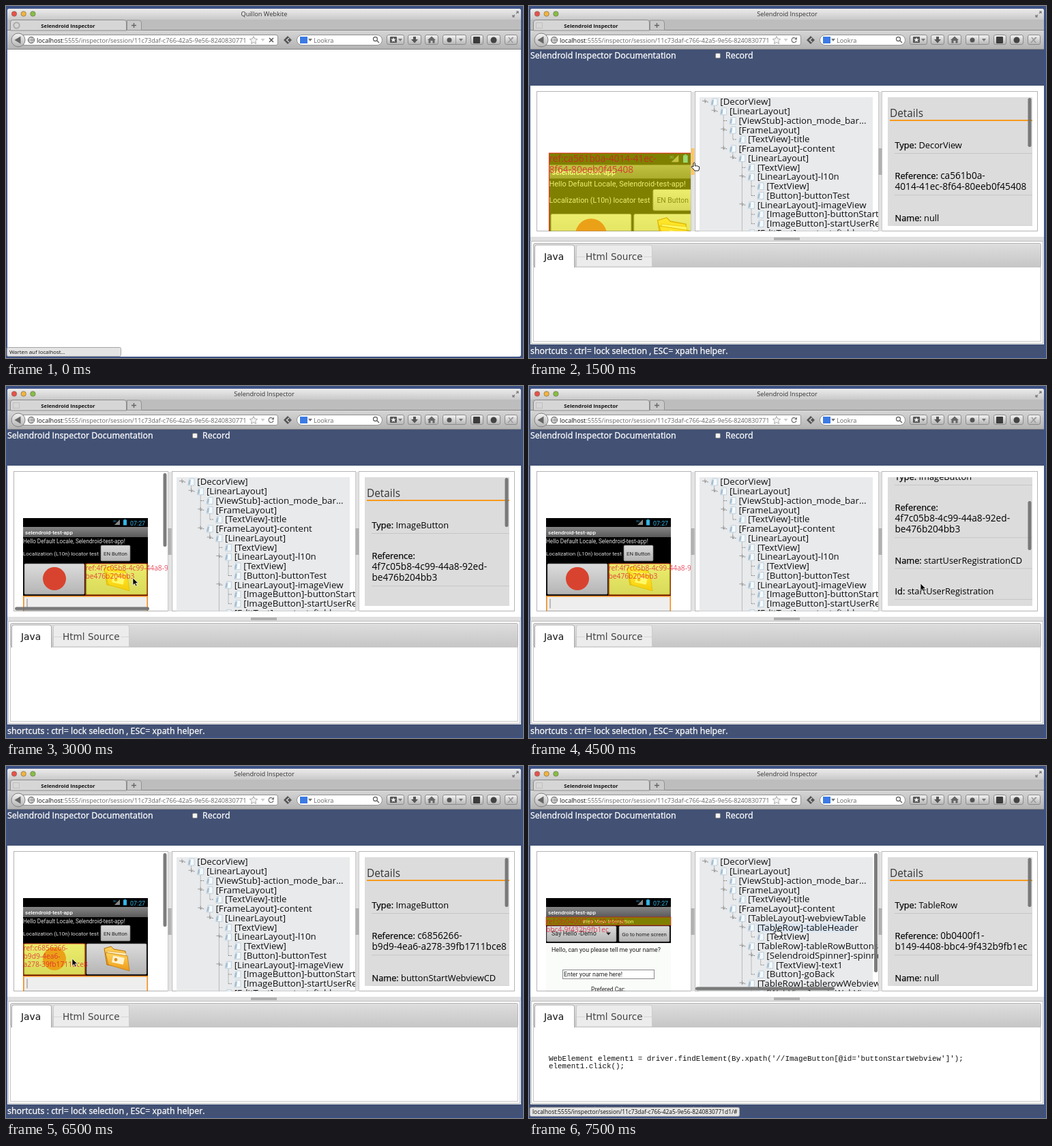
Write an HTML page that moves like this. It is 758 px wide and 517 px high and loops after 8000 ms.

```html
<!DOCTYPE html>
<html lang="en">
<head>
<meta charset="utf-8">
<title>Inspector demo</title>
<style>
html, body { margin: 0; width: 100%; height: 100%; overflow: hidden; background: #3c5184; }
svg { display: block; width: 758px; height: 517px; font-family: "Open Sans", "Noto Sans", sans-serif; }
text { white-space: pre; }
.phone { font-family: Roboto, sans-serif; }
.tabs { font-family: "DejaVu Sans", sans-serif; }
.code { font-family: "Liberation Mono", monospace; }
.bright { stroke: #fff; stroke-width: .3px; }
</style>
</head>
<body>
<svg id="stage" viewBox="0 0 758 517"></svg>
<script>
const STEP = 500, LOOP = 8000;
const stage = document.getElementById('stage');

const rect = (x, y, w, h, fill, more = '') => `<rect x="${x}" y="${y}" width="${w}" height="${h}" fill="${fill}" ${more}/>`;
const circle = (x, y, r, fill, more = '') => `<circle cx="${x}" cy="${y}" r="${r}" fill="${fill}" ${more}/>`;
const path = (d, fill, more = '') => `<path d="${d}" fill="${fill}" ${more}/>`;
const line = (d, stroke, width = 1, more = '') => path(d, 'none', `stroke="${stroke}" stroke-width="${width}" ${more}`);
const text = (x, y, s, size, fill = '#111', more = '') => `<text x="${x}" y="${y}" font-size="${size}" fill="${fill}" ${more}>${s}</text>`;
const group = (body, more = '') => `<g ${more}>${body}</g>`;
const clip = (id, x, y, w, h) => `<clipPath id="${id}">${rect(x, y, w, h, '#000')}</clipPath>`;
const gradient = (id, ...colors) => `<linearGradient id="${id}" x2="0" y2="1">${colors.map((c, i) =>
  `<stop offset="${i / (colors.length - 1)}" stop-color="${c}"/>`).join('')}</linearGradient>`;
const middle = 'text-anchor="middle"';

const defs = gradient('title', '#ececec', '#c9c9c9') + gradient('bar', '#d6d6d6', '#b2b2b2') +
  gradient('knob', '#f4f4f4', '#b4b4b4') + gradient('strip', '#dedede', '#c6c6c6') +
  gradient('appbar', '#858585', '#5a5a5a') + gradient('key', '#dcdcdc', '#b4b4b4') +
  gradient('folder', '#ffd45c', '#ee9a16');

// Browser window

const arrowDown = (x, y, fill = '#777') => path(`M${x - 3} ${y - 2}h6l-3 4z`, fill);

function toolButton(x, w, icon) {
  return rect(x + .5, 42.5, w, 14, 'url(#knob)', 'rx="2.5" stroke="#8c8c8c"') + icon;
}

function browser(loading) {
  const lights = ['#e9514b', '#f2b43c', '#83c043'].map((c, i) =>
    circle(12 + i * 13.7, 11.5, 3.7, c, 'stroke="#7c6a5a" stroke-width=".7"')).join('');
  const tools = [
    toolButton(558, 25, rect(563, 45, 10, 9, '#555', 'rx="1"') +
      path('M568 46l1.1 2.4 2.6.2-2 1.7.7 2.5-2.4-1.4-2.3 1.4.6-2.5-2-1.7 2.7-.2z', '#eee') + arrowDown(578, 50)),
    toolButton(589, 19, path('M597 45h4v4h3l-5 5.5-5-5.5h3z', '#555')),
    toolButton(614, 19, path('M624 44.5l6 5.5h-1.5v4.5h-3V51h-3v3.5h-3V50H618z', '#666')),
    toolButton(640, 34, circle(650, 50, 3.5, '#555') + line('M659.5 43v13', '#999') + arrowDown(667, 50)),
    toolButton(681, 18, rect(685, 45, 10, 10, '#3c3c3c', 'rx="1"')),
    toolButton(705, 19, circle(715, 50, 4.5, '#444')),
    toolButton(731, 18, line('M736 54l7-8M737 46l6 8M739 51l5-5', '#999', 1.3))
  ].join('');
  const name = loading ? 'Quillon Webkite' : 'Selendroid Inspector';
  return rect(0, 0, 758, 517, '#3c5184') +
    rect(2, 4, 753, 511, '#fff', 'rx="3"') +
    path('M2 20V8q0-4 4-4h745q4 0 4 4v12z', 'url(#title)') +
    rect(2, 20, 753, 16, '#bdbdbd') + rect(2, 36, 753, 28, 'url(#bar)') +
    line('M2 35.5h753M2 63.5h753', '#858585') +
    lights + text(378.5, 15, name, 9.2, '#333', middle) +
    line('M743 16l3-3m-3 0v3h3M751 8l-3 3m3 0v-3h-3', '#777', 1.2) +
    path('M6.5 36V24q0-3.5 3.5-3.5h163q3.5 0 3.5 3.5v12z', '#d6d6d6', 'stroke="#8b8b8b"') +
    path('M177.5 35.5V21h17q4 0 4 4v10.5z', '#c9c9c9', 'stroke="#929292"') +
    line('M184 28.5h7M187.5 25v7', '#666', 1.4) +
    (loading ? circle(15.5, 28.5, 4.2, 'none', 'stroke="#aaa" stroke-width="2"')
      : rect(10.5, 24.5, 9, 8, 'none', 'stroke="#aaa" stroke-dasharray="1 1"')) +
    text(91, 32, 'Selendroid Inspector', 7.7, '#111', middle + ' font-weight="700"') +
    rect(22.5, 42.5, 376, 15, '#fff', 'rx="2.5" stroke="#929292"') +
    circle(18, 50, 10, 'url(#knob)', 'stroke="#818181"') + path('M12.5 50l9-5.5v11z', '#666') +
    circle(37, 50, 4.7, '#a5a5a5', 'stroke="#6d6d6d"') + line('M33 48h8M34 52h7M37 46q-4 4 0 8', '#eee', .8) +
    text(45, 53.5, 'localhost<tspan fill="#666">:5555/inspector/session/11c73daf-c766-42a5-9e56-8240830771</tspan>', 9.15) +
    path('M363 44.5l1.7 3.6 4 .5-2.9 2.8.7 4-3.5-1.9-3.5 1.9.7-4-2.9-2.8 4-.5z', '#f4f4f4', 'stroke="#aaa"') +
    arrowDown(376.5, 50, '#ccc') +
    (loading ? line('M386 47l6 6m0-6l-6 6', '#555', 1.5)
      : line('M391.5 48a3.5 3.5 0 1 0 .5 3', '#777', 1.3) + path('M393 45.5v4h-4z', '#777')) +
    path('M413 44l6 6-6 6-6-6z', '#555') + line('M415 47l-3.5 3 3.5 3', '#ddd', 1.2) +
    rect(426.5, 42.5, 125, 15, '#fff', 'rx="7.5" stroke="#929292"') +
    rect(431, 45, 11, 10, '#3c7ae4') + arrowDown(446, 50) + text(451, 53.5, 'Lookra', 9.2, '#666') +
    circle(541.5, 48.5, 3, 'none', 'stroke="#666" stroke-width="1.3"') + line('M544 51l3 3', '#666', 1.6) + tools;
}

function statusBubble(message, width, size) {
  return rect(1.5, 501.5, width, 13, '#e4e4e4', 'rx="2" stroke="#a5a5a5"') + text(5, 511, message, size);
}

// Phone screen, 183 units wide

function button(x, y, w, h, label = '', size = 7.8) {
  return rect(x, y, w, h, 'url(#key)', 'rx="1.5" stroke="#777" stroke-width=".7"') +
    (label && text(x + w / 2, y + h / 2 + 3, label, size, '#222', middle));
}

const statusBar = rect(0, 0, 183, 330, '#000') +
  text(157, 10.5, '07:27', 8.9, '#33b5e5') +
  path('M134 10l8-8v8z', '#888') + text(132, 6, '3G', 4, '#33b5e5') +
  rect(147, 2.5, 5, 8, '#33b5e5') + rect(148.5, 1.5, 2, 1, '#33b5e5') +
  rect(0, 13, 183, 15, 'url(#appbar)') +
  text(3, 24, 'selendroid-test-app', 8, '#fff', 'font-weight="500"');

const folder = path('M119 74l10-3 4 4 17 3 2 25-29-5z', 'url(#folder)', 'stroke="#b56d08"') +
  path('M123 78l28 3v21l-26-6z', '#fff0c0', 'stroke="#d69b31" stroke-width=".6"') +
  path('M121 80l32 5 3 22-31-9z', 'url(#folder)', 'stroke="#c37b12" stroke-width=".8"') +
  rect(131, 86, 17, 10, '#fff3cf', 'transform="rotate(12 139 91)"') + circle(136, 90.5, 2.4, '#d9902c');

const screens = {
  home: text(0, 37, 'Hello Default Locale, Selendroid-test-app!', 8.2, '#ddd') +
    text(0, 54.5, 'Localization (L10n) locator test', 8, '#ddd') +
    button(114, 40, 43, 23, 'EN Button') +
    button(2, 67, 88, 45) + button(93, 67, 88, 45) +
    circle(46, 89, 17, '#d8432f') + folder +
    rect(.8, 114.8, 181.5, 30, '#eee', 'stroke="#f48b1c" stroke-width="1.6"') +
    line('M6 118.5v14', '#888'),
  web: rect(0, 66, 183, 200, '#fafcf9') +
    text(91, 37, 'Web View Interaction', 8, '#eee', middle) +
    button(1, 41, 102, 23) + text(8, 55, 'Say Hello -Demo', 9, '#222') + path('M88 50.5h7l-3.5 4z', '#222') +
    button(107, 41, 74, 23, 'Go to home screen', 7.8) +
    text(88, 79, 'Hello, can you please tell me your name?', 8.9, '#222', middle) +
    rect(24.5, 105.5, 134, 13, '#fff', 'stroke="#888"') + text(26, 115, 'Enter your name here!', 8.9, '#222') +
    text(91, 137, 'Prefered Car:', 8.6, '#222', middle)
};

const marks = {
  root: [0, 0, 183, 330, 'ref:ca561b0a-4014-41ec-', '8f64-80eeb0f45408'],
  folder: [91.5, 67, 91, 46, 'ref:4f7c05b8-4c99-44a8-92ed-', 'be476b204bb3'],
  disc: [.5, 67, 91, 46, 'ref:c6856266-', 'b9d9-4ea6-', 'a278-39fb1711bce8'],
  row: [0, 28, 183, 12, 'ref:0b0400f1-b149-4408-', 'bbc4-9f432b9fb1ec']
};

function highlight(name) {
  if (!name) return '';
  const [x, y, w, h, ...lines] = marks[name];
  return rect(x, y, w, h, '#ff0', 'fill-opacity=".5" stroke="#f00" stroke-opacity=".55"') +
    lines.map((s, i) => text(x, y + 10 + i * 12, s, 10.26, '#e0142e', 'fill-opacity=".75"')).join('');
}

function phone({ large, screen, mark, split }) {
  const place = large ? 'translate(29.5 216) scale(1.337)' : 'translate(25 194)';
  return clip('phonePane', 12, 127, split - 12, 203.5) +
    group(group(group(statusBar + screens[screen], 'class="phone"') + highlight(mark), `transform="${place}"`),
      'clip-path="url(#phonePane)"');
}

// Element tree, each row led by its depth

const shared = ['0[DecorView]', '1[LinearLayout]', '2[ViewStub]-action_mode_bar...', '2[FrameLayout]',
  '3[TextView]-title', '2[FrameLayout]-content'];
const trees = {
  home: [...shared, '3[LinearLayout]', '4[TextView]', '4[LinearLayout]-l10n', '5[TextView]', '5[Button]-buttonTest',
    '4[LinearLayout]-imageView', '5[ImageButton]-buttonStartWebview', '5[ImageButton]-startUserRegistration',
    '4[EditText]-my_text_field'],
  web: [...shared, '3[TableLayout]-webviewTable', '4[TableRow]-tableHeader', '5[TextView]', '4[TableRow]-tableRowButtons',
    '5[SelendroidSpinner]-spinner_webdriver', '6[TextView]-text1', '5[Button]-goBack', '4[TableRow]-tablerowWebview',
    '5[WebView]-mainWebView']
};

function tree({ screen, split, mark }) {
  const left = split + 13, rows = trees[screen], depth = i => +rows[i][0];
  const body = rows.map((row, i) => {
    const x = left + 8 + 13.6 * depth(i), y = 141 + 13.75 * i;
    let last = i;
    for (let j = i + 1; j < rows.length && depth(j) > depth(i); j++) if (depth(j) === depth(i) + 1) last = j;
    const parent = last > i;
    return (mark === 'row' && i === 7 ? rect(x + 21, y - 6, 143, 13, '#dce6f2') : '') +
      (parent ? line(`M${x + 13.6} ${y + 6}V${141 + 13.75 * last}`, '#888', 1, 'stroke-dasharray="1 1"') +
        line(`M${x - 4} ${y - 1.5}h7M${x} ${y - 4.5}v6`, '#999') : '') +
      line(`M${x} ${y}h6`, '#888', 1, 'stroke-dasharray="2 1"') +
      path(`M${x + 11} ${y - 5}h7v10h-9z`, '#f5fafd', 'stroke="#b4c8d6" stroke-width=".8"') +
      path(`M${x + 10} ${y - 2}l3-2-1 8h-3z`, '#a6bfd2') +
      text(x + 22.3, y + 4.3, row.slice(1), 13.25);
  }).join('');
  return clip('treePane', split + 7, 127, 511 - split - 6, 203.5) +
    group(rect(left, 134, 504 - left, 197, '#e8eaec') + body, 'clip-path="url(#treePane)"');
}

// Details

const details = {
  root: [['Type', 'DecorView'], ['Reference', 'ca561b0a-', '4014-41ec-8f64-80eeb0f45408'], ['Name', 'null']],
  folder: [['Type', 'ImageButton'], ['Reference', '', '4f7c05b8-4c99-44a8-92ed-', 'be476b204bb3'],
    ['Name', 'startUserRegistrationCD'], ['Id', 'startUserRegistration']],
  disc: [['Type', 'ImageButton'], ['Reference', 'c6856266-', 'b9d9-4ea6-a278-39fb1711bce8'], ['Name', 'buttonStartWebviewCD']],
  row: [['Type', 'TableRow'], ['Reference', '0b0400f1-', 'b149-4408-bbc4-9f432b9fb1ec'], ['Name', 'null']]
};

function detailsPane({ info, scroll }) {
  let y = 209;
  const fields = details[info].map(([label, first, ...rest]) => {
    const size = label === 'Reference' ? 13.65 : 12.8;
    let out = text(536.5, y, `<tspan stroke="#000" stroke-width=".25">${label}:</tspan> <tspan font-size="${size}">${first}</tspan>`, 12.8, '#000');
    for (const s of rest) out += text(536.5, y += 16, s, size, '#000');
    out += line(`M536 ${y + 7.5}h202`, '#c6c6c6');
    y += 45.3;
    return out;
  }).join('');
  return clip('details', 526, 134, 212, 189) + rect(526, 134, 212, 189, '#dcdcdc') +
    group(group(text(529, 163, 'Details', 15.4, '#333') + rect(529, 167, 209, 2, '#f79a1c') + fields,
      `transform="translate(0 ${-scroll})"`), 'clip-path="url(#details)"');
}

// Page

const thumb = (x, y, w, h) => rect(x, y, w, h, '#6e6e6e', 'rx="2.5" fill-opacity=".9"');
const bars = {
  d: s => thumb(731.5, 135 + s.scroll * .48, 5, 72),
  v: () => thumb(230.5, 128, 5, 108),
  h: () => thumb(13, 324.5, 197, 5),
  t: s => thumb(506, 128, 5, s.screen === 'web' ? 175 : 115) + thumb(244, 324.5, s.screen === 'web' ? 204 : 215, 5)
};

const pane = (x, right) => rect(x + .5, 125.5, right - x, 205, '#fff', 'stroke="#b4b4b4"');
const handle = (x, hot) => rect(x, 126, 5, 205, '#e2e2e2') + rect(x, 209, 5, 39, hot ? '#f9c567' : '#b0b0b0');

function page(s) {
  return rect(2, 64, 753, 451, '#425174') +
    text(2, 76.5, 'Selendroid Inspector Documentation', 12.45, '#fff', 'class="bright"') +
    rect(273.5, 69.5, 7, 7, '#f4f4f4', 'rx="1.5" stroke="#888"') +
    text(288, 76.5, 'Record', 12.45, '#fff', 'class="bright"') +
    rect(2, 117, 753, 380, '#fff') +
    pane(11, s.split) + pane(s.split + 6, 512) + pane(517, 745) +
    handle(s.split + .5, s.hot) + handle(512.5) +
    phone(s) + tree(s) + detailsPane(s) + [...s.bars].map(b => bars[b](s)).join('') +
    rect(2, 339, 753, 6, '#e0e0e0') + rect(359, 340, 38, 4, '#b0b0b0') +
    rect(3.5, 345.5, 750, 150, '#fff', 'stroke="#bbb"') +
    rect(6.5, 348.5, 744, 35, 'url(#strip)', 'rx="2.5" stroke="#b6b6b6"') +
    rect(6.5, 383.5, 744, 109, '#fff', 'stroke="#c6c6c6"') +
    path('M8.5 384V354q0-3 3-3h52q3 0 3 3v30z', '#fff', 'stroke="#aaa"') + rect(9, 383, 57, 2, '#fff') +
    path('M69.5 383V354q0-3 3-3h105q3 0 3 3v29z', '#ececec', 'stroke="#ccc"') +
    line('M70 368.5h12m86 0h12', '#d6d6d6') +
    group(text(22, 373, 'Java', 13.8, '#111') + text(83, 373, 'Html Source', 13.6, '#444'), 'class="tabs"') +
    (s.code ? group(text(29, 433, "WebElement element1 = driver.findElement(By.xpath('//ImageButton[@id='buttonStartWebview']');", 10.9) +
      text(29, 444, 'element1.click();', 10.9), 'class="code"') : '') +
    text(2, 510.5, 'shortcuts : ctrl= lock selection , ESC= xpath helper.', 12.45, '#fff', 'class="bright"');
}

function pointer([x, y], hand) {
  const shape = hand
    ? path('M0 1q1.5-2 2.5 0v4q3-1 6 1 1 3-1 6H2Q0 9-3 6.5q0-2 3-.5z', '#fff', 'stroke="#000" stroke-width=".9"')
    : path('M0 0v10.5l2.5-2.3 1.8 3.9 1.8-.8-1.8-3.7h3.5z', '#000', 'stroke="#fff" stroke-width=".7"');
  return group(shape, `transform="translate(${x} ${y})"`);
}

// Every step changes only what differs from the one before
const steps = [
  { loading: true, split: 353, large: true, screen: 'home', mark: 'root', info: 'root', scroll: 0, bars: '' },
  { loading: false, at: [296, 264.5], bars: 'd' },
  { at: [356, 230], hand: true, hot: true, bars: '' },
  { split: 237, at: [241, 230], bars: 'd' },
  { large: false, bars: 'vt' },
  { at: [206, 266], hand: false, hot: false, mark: 'folder', bars: '' },
  { at: [186, 282], info: 'folder', bars: 'vhd' },
  { bars: '' },
  { at: [554, 291] },
  { at: [574, 290], scroll: 71, bars: 'd' },
  { scroll: 88 },
  { at: [165, 284], scroll: 0, bars: '' },
  {},
  { at: [97, 283], mark: 'disc', info: 'disc', bars: 'vd' },
  { screen: 'web', mark: '', code: true, bars: '' },
  { at: [362, 238], hand: true, mark: 'row', info: 'row', bars: 'td', link: true }
];
let state = {};
const scenes = steps.map(step => {
  state = { ...state, ...step };
  const s = state;
  return `<defs>${defs}</defs>` + browser(s.loading) +
    (s.loading ? statusBubble('Warten auf localhost…', 167, 7.86) : page(s)) +
    (s.link ? statusBubble('localhost:5555/inspector/session/11c73daf-c766-42a5-9e56-8240830771d1/#', 307, 8.38) : '') +
    (s.at ? pointer(s.at, s.hand) : '');
});

let shown = -1;
function tick() {
  const index = Math.floor(performance.now() % LOOP / STEP);
  if (index !== shown) stage.innerHTML = scenes[shown = index];
  requestAnimationFrame(tick);
}
tick();
</script>
</body>
</html>
```
